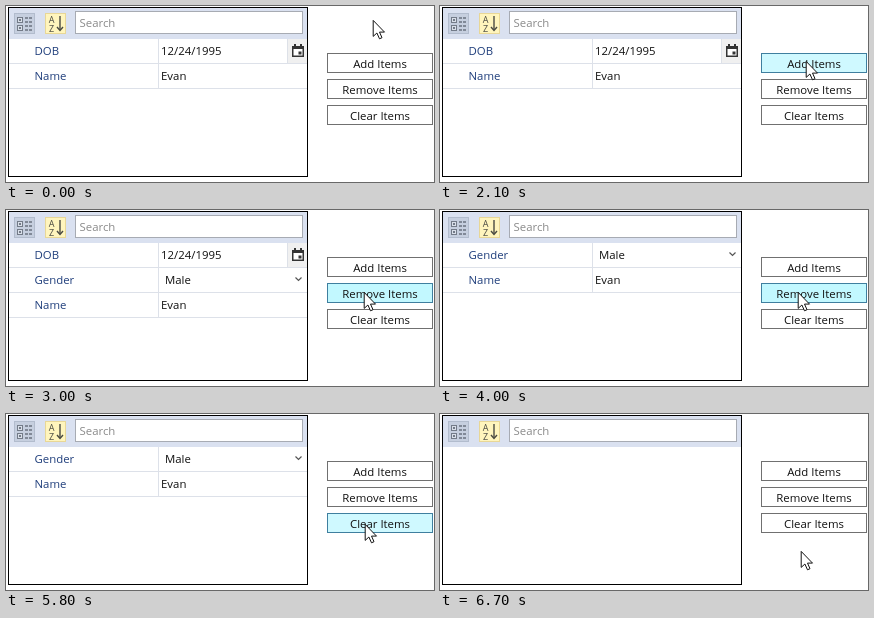
Recreate the animation shown at these times as an HTML page with a canvas. Size 428 by 176 pixels, loop 7000 ms.

```html
<!DOCTYPE html>
<html lang="en">
<head>
<meta charset="utf-8">
<title>Property grid</title>
<style>
html, body { margin: 0; width: 428px; height: 176px; overflow: hidden; background: #fff; }
canvas { display: block; width: 428px; height: 176px; }
</style>
</head>
<body>
<canvas id="stage"></canvas>
<script>
const W = 428, H = 176, LOOP = 7000, STEP = 100;
const canvas = document.getElementById('stage');
const ctx = canvas.getContext('2d');
const dpr = window.devicePixelRatio || 1;
canvas.width = W * dpr;
canvas.height = H * dpr;
ctx.scale(dpr, dpr);

const FONT = '11.4px "Open Sans", "Noto Sans", sans-serif';
const BUTTONS = [['Add Items', 47], ['Remove Items', 73], ['Clear Items', 99]];
const CLICKS = [2100, 3900, 5800];

// Cursor moves: start time, then one point per step
const MOVES = [
  [600, [[367, 16], [367, 22], [367, 31], [367, 43], [367, 55], [366, 61], [366, 55]]],
  [2700, [[364, 62], [361, 70], [359, 78], [358, 82]]],
  [4500, [[357, 88], [357, 96], [358, 105], [359, 110]]],
  [6300, [[359, 113], [359, 120], [360, 129], [361, 135], [361, 137]]]
];

function cursorAt(t) {
  let pos = [367, 14];
  for (const [start, pts] of MOVES) {
    if (t < start) break;
    pos = pts[Math.min(pts.length - 1, Math.floor((t - start) / STEP))];
  }
  return pos;
}

function rowsAt(t) {
  if (t < 2200) return ['DOB', 'Name'];
  if (t < 4000) return ['DOB', 'Gender', 'Name'];
  return t < 5900 ? ['Gender', 'Name'] : [];
}

function fill(x, y, w, h, color) {
  ctx.fillStyle = color;
  ctx.fillRect(x, y, w, h);
}

function box(x, y, w, h, bg, border) {
  fill(x, y, w, h, border);
  fill(x + 1, y + 1, w - 2, h - 2, bg);
}

function text(str, x, y, color, align = 'left', font = FONT) {
  ctx.font = font;
  ctx.textAlign = align;
  ctx.fillStyle = color;
  ctx.fillText(str, x, y);
}

function line(points, color, width) {
  ctx.beginPath();
  points.forEach(([x, y]) => ctx.lineTo(x, y));
  ctx.strokeStyle = color;
  ctx.lineWidth = width;
  ctx.stroke();
}

function drawToolbar() {
  fill(3, 2, 298, 31, '#dae1f0');

  box(8, 7, 21, 21, '#c6cfdf', '#b2bccd');
  for (const y of [11, 19]) {
    box(11, y, 6, 6, '#d9dfe9', '#737b88');
    fill(13, y + 2, 2, 2, '#737b88');
    for (const x of [19, 23]) {
      fill(x, y, 3, 2, '#818997');
      fill(x, y + 4, 3, 2, '#818997');
    }
  }

  box(39, 7, 21, 21, '#fff5bd', '#e8d797');
  const small = '9px "Open Sans", "Noto Sans", sans-serif';
  text('A', 45.5, 16.5, '#4a4a42', 'center', small);
  text('Z', 45.5, 25.5, '#4a4a42', 'center', small);
  line([[54, 10], [54, 24]], '#4a4a42', 1.4);
  line([[51, 21], [54, 24.5], [57, 21]], '#4a4a42', 1.4);

  box(69, 5, 228, 23, '#fff', '#a7abb3');
  text('Search', 73.5, 21, '#8a8a8a');
}

function drawCalendar(y) {
  fill(281, y, 20, 24, '#f0f0f0');
  fill(281, y, 1, 24, '#dde1e8');
  fill(286, y + 7, 12, 11, '#333');
  fill(288, y + 5, 2, 3, '#333');
  fill(294, y + 5, 2, 3, '#333');
  fill(287.5, y + 10, 9, 6.5, '#fff');
  fill(292.5, y + 12.5, 3, 3, '#333');
}

function drawRow(name, i) {
  const y = 33 + i * 25;
  const base = y + 16;
  text(name, 28.5, base, '#203f7c');
  fill(3, y + 24, 298, 1, '#dde1e9');
  fill(152, y, 1, 25, '#dde1e9');
  if (name === 'DOB') {
    text('12/24/1995', 155, base, '#111');
    drawCalendar(y);
  } else if (name === 'Gender') {
    text('Male', 159, base, '#111');
    line([[289.5, y + 9.5], [292.5, y + 12.5], [295.5, y + 9.5]], '#555', 1.2);
  } else {
    text('Evan', 155, base, '#111');
  }
}

function drawButton([label, y], mx, my, pressed) {
  const over = mx >= 321 && mx < 427 && my >= y && my < y + 20;
  const bg = !over ? '#fff' : pressed ? '#cff9ff' : '#c2f8ff';
  box(321, y, 106, 20, bg, over ? '#3f7f9f' : '#707070');
  text(label, 374, y + 15, '#111', 'center');
}

function drawCursor(x, y) {
  const shape = [[0, 0], [0, 16], [3.7, 12.6], [6.3, 18.4], [8.8, 17.3], [6.3, 11.7], [11.3, 11.7]];
  ctx.beginPath();
  shape.forEach(([dx, dy]) => ctx.lineTo(x + dx + 0.2, y + dy + 0.4));
  ctx.closePath();
  ctx.fillStyle = '#fff';
  ctx.fill();
  ctx.strokeStyle = '#111';
  ctx.lineWidth = 1;
  ctx.stroke();
}

function draw(t) {
  fill(0, 0, W, H, '#fff');
  box(2, 1, 300, 170, '#fff', '#000');
  drawToolbar();
  rowsAt(t).forEach(drawRow);
  const [mx, my] = cursorAt(t);
  const pressed = CLICKS.some(c => t >= c && t < c + STEP);
  BUTTONS.forEach(b => drawButton(b, mx, my, pressed));
  drawCursor(mx, my);
}

const begin = performance.now();
function frame() {
  draw((performance.now() - begin) % LOOP);
  requestAnimationFrame(frame);
}
frame();
</script>
</body>
</html>
```
